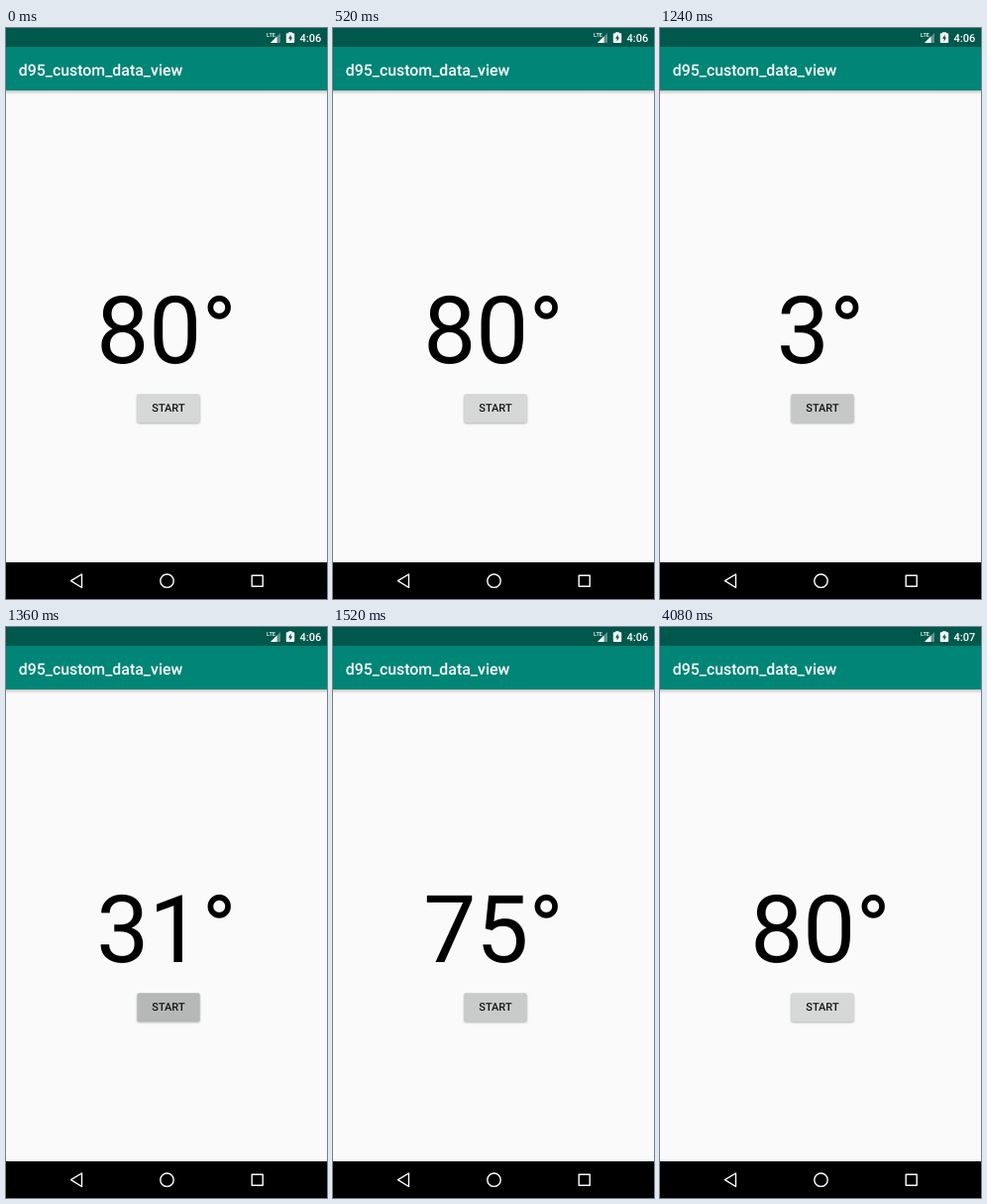
Write an HTML page that moves like this. It is 324 by 576 pixels and loops after 4.68 s.

```html
<!DOCTYPE html>
<html lang="en">
<head>
<meta charset="utf-8">
<title>d95_custom_data_view</title>
<style>
  html, body { margin: 0; width: 100%; height: 100%; overflow: hidden; background: #fafafa; }
  svg { display: block; width: 324px; height: 576px; }
  text { font-family: Roboto, sans-serif; font-weight: 500; text-rendering: geometricPrecision; }
  #degrees { font-weight: 400; }
</style>
</head>
<body>
<svg viewBox="0 0 324 576">
  <defs>
    <linearGradient id="shade" x2="0" y2="1">
      <stop offset="0" stop-color="#000" stop-opacity=".22"/>
      <stop offset="1" stop-color="#000" stop-opacity="0"/>
    </linearGradient>
    <filter id="soft" x="-10%" y="-20%" width="120%" height="140%">
      <feGaussianBlur stdDeviation=".8"/>
    </filter>
  </defs>
  <rect width="324" height="576" fill="#fafafa"/>

  <!-- App bar -->
  <rect y="63" width="324" height="4" fill="url(#shade)"/>
  <rect y="19" width="324" height="44" fill="#008577"/>
  <text x="12.7" y="47.8" font-size="15.9" fill="#fff">d95_custom_data_view</text>

  <!-- Status bar -->
  <rect width="324" height="19" fill="#00574b"/>
  <g fill="#fff">
    <path d="M267 15H277V5Z" opacity=".35"/>
    <path d="M267 15H273.5V8.5Z"/>
    <text x="263" y="8.8" font-size="5.6">LTE</text>
    <path d="M285.2 4.2h3.6v1.1h1.6q.8 0 .8.8v8.1q0 .8-.8.8h-6.8q-.8 0-.8-.8V6.1q0-.8.8-.8h1.6z"/>
    <path d="M287.6 6.6l-2.6 4.1h1.6v3l2.5-4.2h-1.5z" fill="#00574b"/>
    <text id="clock" x="318.3" y="14.2" font-size="11.03" text-anchor="end">4:06</text>
  </g>

  <!-- Content -->
  <text id="degrees" x="162" y="338" font-size="94.5" text-anchor="middle">80°</text>
  <rect x="132.4" y="370.5" width="63.2" height="28.4" rx="1.6" opacity=".3" filter="url(#soft)"/>
  <rect x="132.4" y="369.3" width="63.2" height="28.8" rx="1.6" fill="#d6d7d7"/>
  <rect id="ripple" x="132.4" y="369.3" width="63.2" height="28.8" rx="1.6" opacity="0"/>
  <text x="164" y="387.3" font-size="11.03" fill="#141414" text-anchor="middle">START</text>

  <!-- Navigation bar -->
  <rect y="539" width="324" height="37"/>
  <g fill="none" stroke="#fff" stroke-width="1.4" stroke-linejoin="round">
    <path d="M76.5 551V564.5L65.5 557.7Z"/>
    <circle cx="162.5" cy="557.7" r="6.7"/>
    <rect x="248.2" y="552.2" width="11" height="11"/>
  </g>
</svg>
<script>
  const LOOP = 4680, TARGET = 80;
  const COUNT = { start: 1193, duration: 390 };
  const clock = document.getElementById('clock');
  const degrees = document.getElementById('degrees');
  const ripple = document.getElementById('ripple');

  const progress = (t, start, duration) => Math.min(1, Math.max(0, (t - start) / duration));
  const easeInOut = x => (1 - Math.cos(Math.PI * x)) / 2;

  function reading(t) {
    if (t < COUNT.start) return TARGET;
    return Math.round(TARGET * easeInOut(progress(t, COUNT.start, COUNT.duration)));
  }

  function draw(t) {
    clock.textContent = t < 4080 ? '4:06' : '4:07';
    degrees.textContent = reading(t) + '°';
    const pressed = progress(t, 1180, 120) - progress(t, 1360, 280);
    ripple.setAttribute('opacity', 0.15 * pressed);
  }

  const begin = performance.now();
  function tick() {
    draw((performance.now() - begin) % LOOP);
    requestAnimationFrame(tick);
  }
  draw(0);
  requestAnimationFrame(tick);
</script>
</body>
</html>
```
